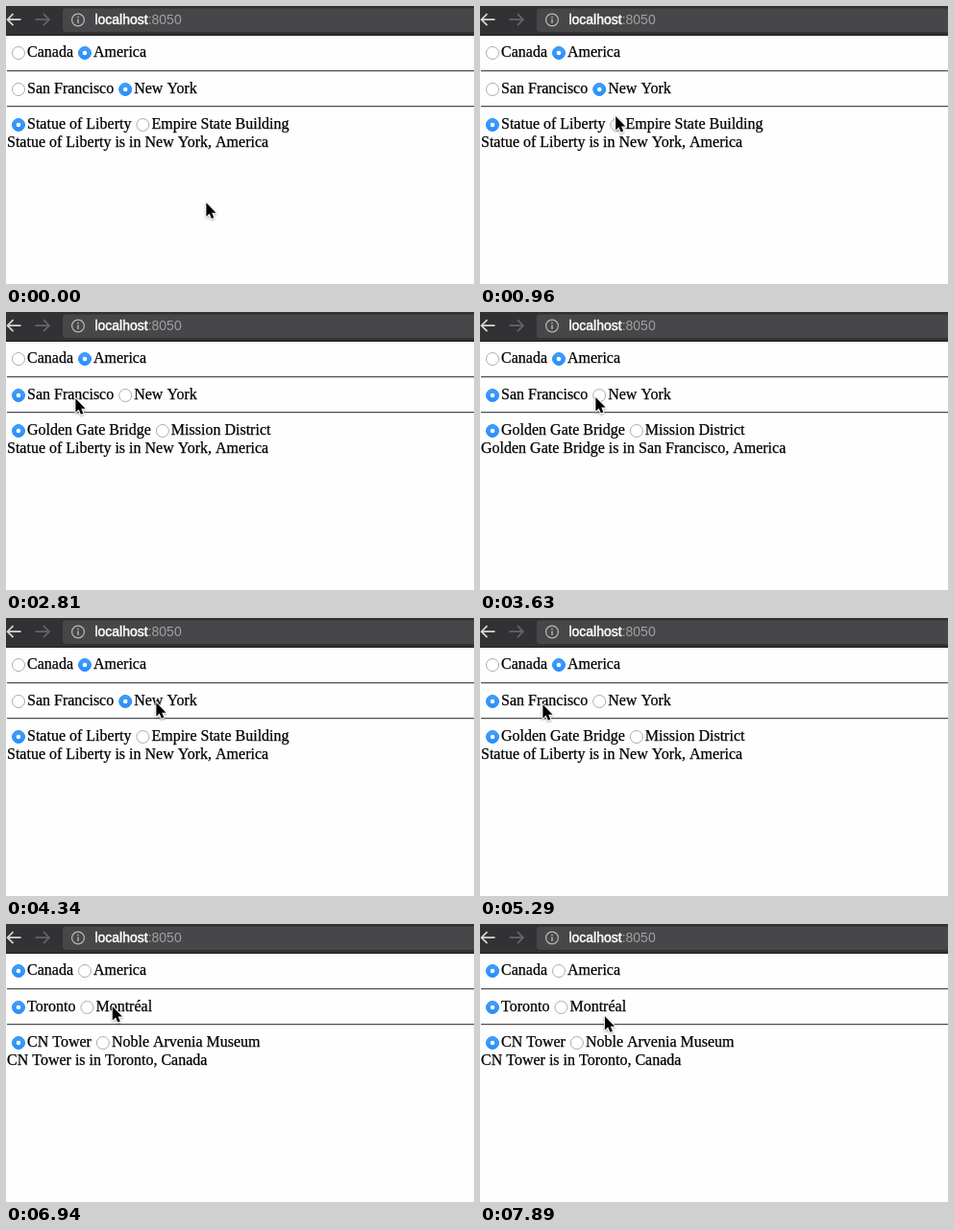
Recreate the animation shown at these times as an HTML page. Size 487 by 290 pixels, loop 8 s.

```html
<!DOCTYPE html>
<html lang="en">
<head>
<meta charset="utf-8">
<title>Linked radio buttons</title>
<style>
  html, body { margin: 0; width: 100%; height: 100%; overflow: hidden; background: #fefefe; }
  svg { display: block; width: 487px; height: 290px; }
  .page { font: 16px "Liberation Serif", "Times New Roman", serif; }
  .page text { fill: #000; stroke: #000; stroke-width: .25; }
  .url { font: 14px "Liberation Sans", Arial, sans-serif; }
  .ring { fill: #fff; stroke: #acacac; }
  .ring.down { fill: #e7e7e7; stroke: #9c9c9c; }
  .ring.on { fill: url(#blue); stroke: #2e90f8; }
  .dot { fill: #fff; }
</style>
</head>
<body>
<svg viewBox="0 0 487 290">
  <defs>
    <linearGradient id="blue" x2="0" y2="1">
      <stop stop-color="#439ffb"/>
      <stop offset="1" stop-color="#268dfb"/>
    </linearGradient>
    <filter id="shadow" x="-50%" y="-50%" width="200%" height="200%">
      <feDropShadow dx="0" dy="1" stdDeviation="1" flood-opacity=".4"/>
    </filter>
  </defs>

  <rect width="487" height="290" fill="#fefefe"/>
  <rect width="487" height="31" fill="#1d1d1f"/>
  <rect width="487" height="30" fill="#323234"/>
  <rect x="59" y="2.5" width="440" height="24.5" rx="3" fill="#474749"/>
  <g fill="none" stroke-width="1.7">
    <path d="M15.5 14.2H1.5M7.5 8.2L1.5 14.2L7.5 20.2" stroke="#d6d6d6"/>
    <path d="M30.5 14.2H45M39 8.2L45 14.2L39 20.2" stroke="#646466"/>
    <circle cx="75" cy="14.5" r="6.4" stroke="#b9b9b9" stroke-width="1.2"/>
    <path d="M75 13.5V18M75 10.7V12.2" stroke="#b9b9b9" stroke-width="1.4"/>
  </g>
  <text class="url" x="92.4" y="19.4" fill="#a0a0a2"><tspan fill="#fff" stroke="#fff" stroke-width=".45">localhost</tspan>:8050</text>

  <path d="M1 67.6H487M1 104.6H487" stroke="#4e4e4e" stroke-width="1.3"/>
  <g class="page" id="page"></g>
  <path id="cursor" d="M1.4 1.2V15.7L4.7 12.6L6.9 17.7L9.4 16.7L7.2 11.7H11.6Z" fill="#000" stroke="#fff"
        stroke-width="1.8" stroke-linejoin="round" paint-order="stroke" filter="url(#shadow)"/>
</svg>
<script>
const LOOP = 8000, STEP = 117, SPACE = 4;
const page = document.getElementById("page");
const cursor = document.getElementById("cursor");

const countries = ["Canada", "America"];
const canada = ["Toronto", "Montréal"];
const america = ["San Francisco", "New York"];
const toronto = ["CN Tower", "Noble Arvenia Museum"];
const sanFrancisco = ["Golden Gate Bridge", "Mission District"];
const newYork = ["Statue of Liberty", "Empire State Building"];

const liberty = "Statue of Liberty is in New York, America";
const empire = "Empire State Building is in New York, America";
const bridge = "Golden Gate Bridge is in San Francisco, America";
const tower = "CN Tower is in Toronto, Canada";

// [time, changed state]; an index of -1 means nothing is checked
const events = [
  [0, { country: 1, cities: america, city: 1, spots: newYork, spot: 0, down: -1, line: liberty }],
  [1410, { spot: 1 }],
  [1530, { line: empire }],
  [1865, { down: 0 }],
  [1985, { spot: 0, down: -1 }],
  [2100, { line: liberty }],
  [2690, { city: 0, spots: sanFrancisco, spot: -1 }],
  [2805, { spot: 0 }],
  [2930, { line: bridge }],
  [4100, { city: 1, spots: newYork, spot: -1 }],
  [4220, { spot: 0 }],
  [4335, { line: liberty }],
  [5170, { city: 0, spots: sanFrancisco, spot: -1 }],
  [5285, { spot: 0 }],
  [5410, { line: bridge }],
  [6120, { country: 0, cities: canada, city: -1 }],
  [6225, { city: 0, spots: toronto, spot: -1 }],
  [6350, { spot: 0, line: tower }]
];

// [time of first step, steps, x, y]
const moves = [
  [120, 4, 154, 104],
  [720, 4, 135, 117],
  [1530, 2, 100, 106],
  [1760, 2, 69, 116.5],
  [2220, 4, 71, 89],
  [3280, 7, 155, 87],
  [4580, 5, 64, 89],
  [5410, 4, 42, 40],
  [6000, 1, 43, 31],
  [6120, 1, 43, 40],
  [6590, 5, 126, 96],
  [7300, 1, 120, 88],
  [7420, 2, 127, 95],
  [7770, 2, 128.5, 95]
];

function add(name, attrs, text) {
  const el = document.createElementNS("http://www.w3.org/2000/svg", name);
  for (const key in attrs) el.setAttribute(key, attrs[key]);
  if (text) el.textContent = text;
  return page.appendChild(el);
}

// Sets each word on its own, so no kerning acts across spaces; returns the end
function write(x, y, line) {
  for (const word of line.split(" ")) {
    x += add("text", { x, y }, word).getComputedTextLength() + SPACE;
  }
  return x - SPACE;
}

function radioRow(labels, checked, down, cy, baseline) {
  let x = 1;
  labels.forEach((label, i) => {
    const on = i === checked, cx = x + 12;
    const look = on ? " on" : i === down ? " down" : "";
    add("circle", { class: "ring" + look, cx, cy, r: 6.5 });
    if (on) add("circle", { class: "dot", cx, cy, r: 2.3 });
    x = write(x + 21, baseline, label);
  });
}

function drawPage(s) {
  page.replaceChildren();
  radioRow(countries, s.country, -1, 49, 53);
  radioRow(s.cities, s.city, -1, 87, 91);
  radioRow(s.spots, s.spot, s.down, 124, 128);
  write(1, 147, s.line);
}

function cursorAt(t) {
  let x = 207, y = 204;
  for (const [start, steps, toX, toY] of moves) {
    const done = Math.floor((t - start + 8) / STEP) + 1;
    if (done < 1) break;
    const u = Math.min(1, done / steps);
    x += (toX - x) * u;
    y += (toY - y) * u;
  }
  return [x, y];
}

let shown = 0;
function render(t) {
  const past = events.filter(([time]) => time <= t);
  if (past.length !== shown) {
    shown = past.length;
    drawPage(Object.assign({}, ...past.map(([, change]) => change)));
  }
  cursor.setAttribute("transform", `translate(${cursorAt(t)})`);
}

const begin = performance.now();
function tick() {
  render((performance.now() - begin) % LOOP);
  requestAnimationFrame(tick);
}
tick();
</script>
</body>
</html>
```
